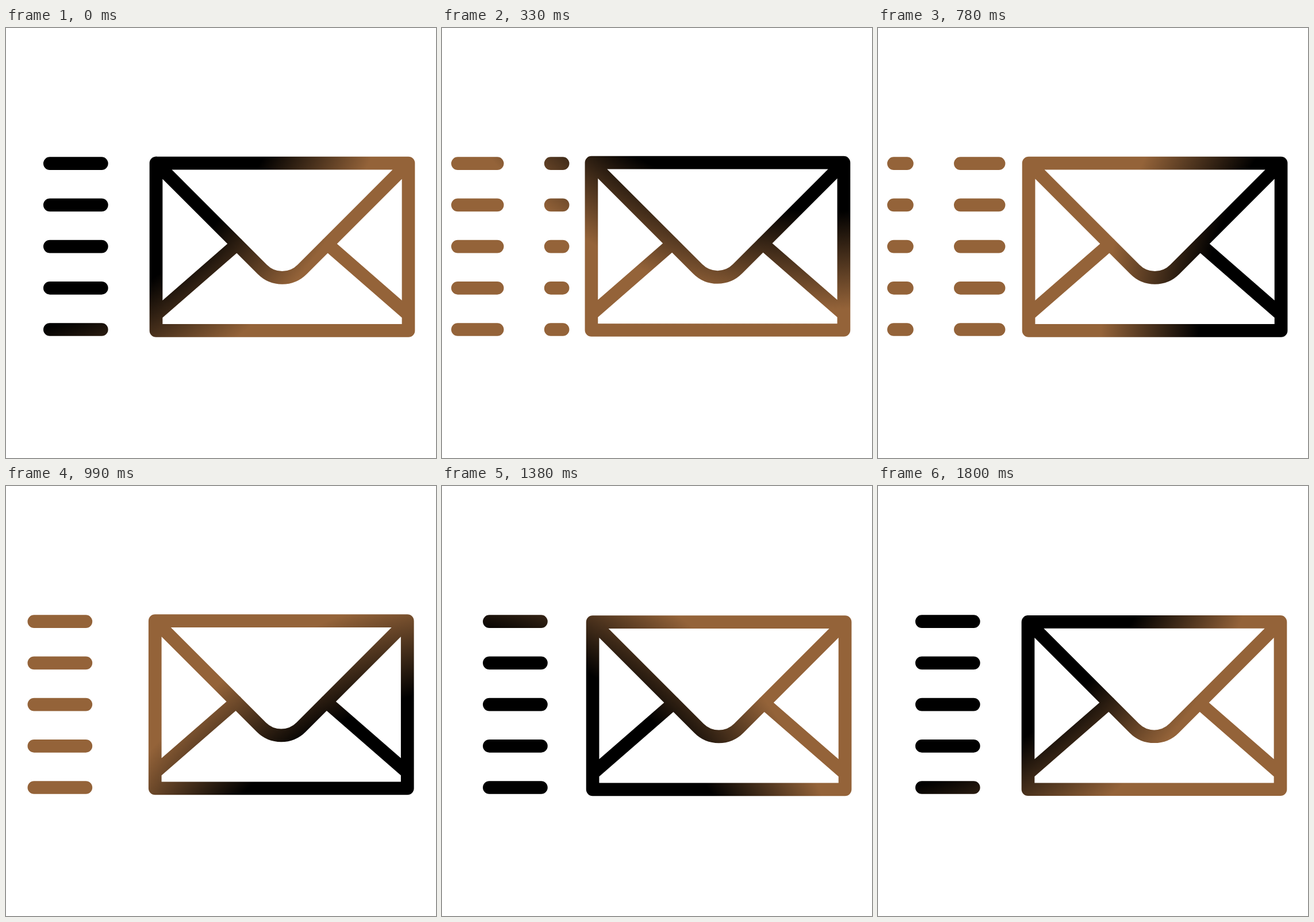
These frames come from a looping animation (748x748 px, 1830 ms). An HTML page with a canvas:

```html
<!DOCTYPE html>
<html lang="en">
<head>
<meta charset="utf-8">
<title>Sending mail</title>
<style>
html, body { margin: 0; height: 100%; overflow: hidden; background: #fff; }
canvas { display: block; }
</style>
</head>
<body>
<canvas id="stage" width="748" height="748"></canvas>
<script>
const ctx = document.getElementById('stage').getContext('2d');
const STEP = 30, STEPS = 61, CYCLE = 60;
const DASH = 90, GAP = 93;
const rad = deg => deg * Math.PI / 180;

const envelope = new Path2D(`
  M261 235.6H700V526.9H261Z
  L445.9 420.5A48.8 48.8 0 0 0 515.1 420.5L700 235.6
  M261 499.2L402 376.4M700 499.2L559 376.4`);

const bars = new Path2D();
for (let i = 0; i < 5; i++) {
  const y = 235.7 + 72.2 * i;
  bars.moveTo(27.4, y);
  bars.lineTo(210.1, y);
}

// A large dark disc with a soft rim orbits the picture.
function shade(n) {
  const a = rad(40 + 360 * n / CYCLE);
  const x = 469 - 725 * Math.cos(a), y = 374 - 690 * Math.sin(a);
  const g = ctx.createRadialGradient(x, y, 610, x, y, 780);
  g.addColorStop(0, '#000');
  g.addColorStop(1, '#946339');
  return g;
}

function draw(n) {
  ctx.clearRect(0, 0, 748, 748);
  ctx.strokeStyle = shade(n);
  ctx.lineWidth = 22.7;
  ctx.lineCap = ctx.lineJoin = 'round';

  ctx.setLineDash([DASH, GAP]);
  ctx.lineDashOffset = 13 * (DASH + GAP) * n / CYCLE - 48.9;
  ctx.stroke(bars);

  // The envelope trembles.
  ctx.save();
  ctx.translate(-1.85 * Math.sin(rad(36 * n)), -1.6 * Math.sin(rad(69.25 * n + 18)));
  ctx.setLineDash([]);
  ctx.stroke(envelope);
  ctx.restore();
}

const start = performance.now();
function tick() {
  draw(Math.floor((performance.now() - start) / STEP) % STEPS);
  requestAnimationFrame(tick);
}
tick();
</script>
</body>
</html>
```
